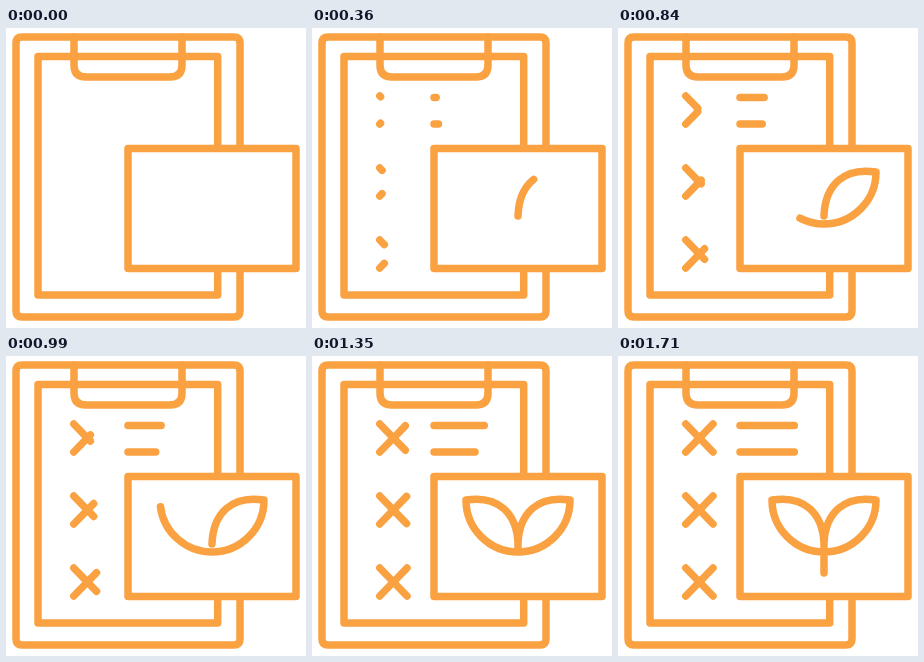
Recreate the animation shown at these times as an HTML page with a canvas. Size 300 by 300 pixels, loop 2100 ms.

```html
<!DOCTYPE html>
<html lang="en">
<head>
<meta charset="utf-8">
<title>Clipboard checklist</title>
<style>
  html, body { margin: 0; width: 100%; height: 100%; overflow: hidden; background: #fff; }
  canvas { display: block; width: 300px; height: 300px; }
</style>
</head>
<body>
<canvas id="stage"></canvas>
<script>
const LOOP = 2100, STEP = 30, SIZE = 300;
const ORANGE = '#faa141';
const canvas = document.getElementById('stage');
const ctx = canvas.getContext('2d');
const ratio = window.devicePixelRatio || 1;
canvas.width = canvas.height = Math.round(SIZE * ratio);

const linear = t => t;
const sine = t => (1 - Math.cos(Math.PI * t)) / 2;

// A stroke that draws itself from its first point to its last.
function stroke(d, start, end, ease) {
  const el = document.createElementNS('http://www.w3.org/2000/svg', 'path');
  el.setAttribute('d', d);
  return { path: new Path2D(d), length: el.getTotalLength(), start, end, ease };
}

const strokes = [
  stroke('M122 69.5H176.3', 180, 1600, sine),
  stroke('M122 96H176.3', 240, 1710, linear),
  stroke('M206 188C207 157 226 139 258 144A52 52 0 0 1 206 196' +
         'A52 52 0 0 1 154 144C186 139 205 157 206 188V217', 0, 1620, sine)
];

// Crosses: the lower rows start first.
[[82, 220], [154, 110], [226, 0]].forEach(([y, start]) => {
  strokes.push(
    stroke(`M67.8 ${y - 14}L95 ${y + 14}`, start, start + 1350, sine),
    stroke(`M67.8 ${y + 14}L95 ${y - 14}`, start, start + 1350, sine)
  );
});

const board = new Path2D('M16 9H228Q234 9 234 15V283Q234 289 228 289H16Q10 289 10 283V15Q10 9 16 9Z');
const sheet = new Path2D('M32 28.5H211.7V267H32Z');
const clip = new Path2D('M68 9V37Q68 49 80 49H164Q176 49 176 37V9');
const card = new Path2D('M122 120.5H290V240.5H122Z');

function drawStroke(s, time) {
  const t = Math.min(1, (time - s.start) / (s.end - s.start));
  if (t <= 0) return;
  ctx.setLineDash(t < 1 ? [s.length * s.ease(t), s.length * 2] : []);
  ctx.stroke(s.path);
}

function draw(time) {
  ctx.setTransform(ratio, 0, 0, ratio, 0, 0);
  ctx.fillStyle = '#fff';
  ctx.fillRect(0, 0, SIZE, SIZE);
  ctx.strokeStyle = ORANGE;
  ctx.lineWidth = 7.5;
  ctx.lineCap = ctx.lineJoin = 'round';
  ctx.setLineDash([]);
  [board, sheet, clip].forEach(p => ctx.stroke(p));
  ctx.fill(card);
  ctx.stroke(card);
  strokes.forEach(s => drawStroke(s, time));
}

const origin = performance.now();
function tick() {
  const time = (performance.now() - origin) % LOOP;
  draw(Math.floor(time / STEP) * STEP);
  requestAnimationFrame(tick);
}
tick();
</script>
</body>
</html>
```
